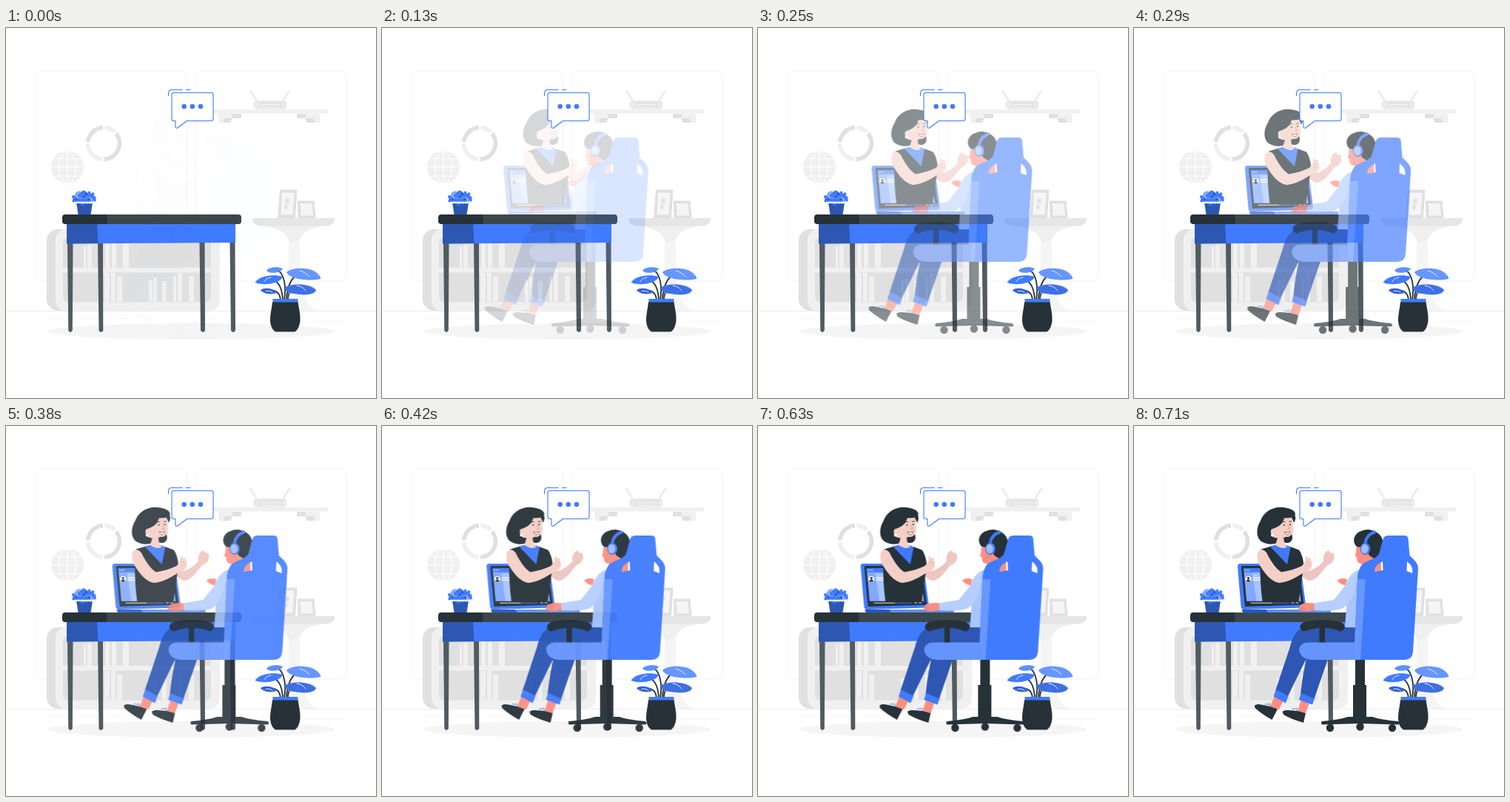
An HTML page that plays this animation: 500 px wide and 500 px high, repeating every 750 ms.

```html
<!DOCTYPE html>
<html lang="en">
<head>
<meta charset="utf-8">
<title>Online lesson</title>
<style>
  html, body { margin: 0; width: 100%; height: 100%; overflow: hidden; background: #fff; }
  svg { display: block; width: 100%; height: 100%; }
  .dark { fill: #263238; }
  .blue { fill: #407bff; }
  .navy { fill: #2d57b3; }
  .coral { fill: #ff8e80; }
  .skin { fill: #f4cfc7; }
  .g1 { fill: #f5f5f5; }
  .g2 { fill: #f0f0f0; }
  .g3 { fill: #e6e6e6; }
  .g4 { fill: #e0e0e0; }
  .white { fill: #fff; }
  .line { fill: none; stroke-linecap: round; stroke-linejoin: round; }
</style>
</head>
<body>
<svg viewBox="0 0 500 500">
  <!-- room -->
  <g class="line" stroke="#f5f5f5">
    <rect x="39.5" y="58" width="205" height="284" rx="8"/>
    <rect x="256.5" y="58" width="204" height="284" rx="8"/>
    <path stroke="#ebebeb" d="M0 382.5H500"/>
    <path d="M55 392.5H130M142 392.5H166M405 396.5H463"/>
  </g>

  <!-- globe and ring -->
  <circle class="g2" cx="83" cy="188" r="22"/>
  <g class="line" stroke="#fff" stroke-width="1.2">
    <path d="M83 166V210M61 188H105M65 176.500H101M65 200H101"/>
    <ellipse cx="83" cy="188" rx="11.500" ry="22"/>
  </g>
  <g class="line" stroke-width="5.500" style="stroke-linecap:butt">
    <path stroke="#e0e0e0" d="M110.700 154A21.400 21.400 0 0 1 131 134.600M148.700 142.500A21.400 21.400 0 0 1 133 177.300"/>
    <path stroke="#f0f0f0" d="M133.500 134.600A21.400 21.400 0 0 1 147 140.400M131 177.300A21.400 21.400 0 0 1 110.700 157"/>
  </g>

  <!-- wall shelf and router -->
  <path class="g2" d="M275 110H435V115.500H275ZM286 115H306V122L293 128H288ZM424 115H405V122L418 128H424Z"/>
  <path class="g4" d="M306 116H318V122H306ZM296 122H306L303 128H293ZM393 116H405V122H393ZM404 122H415L418 128H407Z"/>
  <path class="line" stroke="#e6e6e6" stroke-width="1.800" d="M339 99L330 84.500M374 99L383 84.500"/>
  <path class="g3" d="M337 99Q357 97 377 99Q381 101 379 107L376 109.500H338Q333 107 334 102Q335 99 337 99Z"/>
  <g class="line" stroke="#f5f5f5" stroke-width=".9">
    <circle cx="338" cy="104.500" r="2.600"/><circle cx="375.500" cy="104.500" r="2.200"/>
    <path d="M344 103.500H370M348 108H368"/>
  </g>

  <!-- bookcase -->
  <rect class="g4" x="55" y="272" width="60" height="110" rx="15"/>
  <rect class="g2" x="67" y="272" width="222" height="110" rx="14"/>
  <rect class="g4" x="77" y="283" width="200" height="87.500" rx="8"/>
  <g id="books"></g>
  <rect class="g2" x="77" y="324" width="200" height="6.500"/>

  <!-- side table and picture frames -->
  <path class="g1" d="M382 290H397C397 345 401 373 420 382H360C378 373 383 340 382 290Z"/>
  <path class="g2" d="M346 267H433C408 270 398 277 396 290H383C380 276 366 270 346 267Z"/>
  <path class="g3" d="M333 257H444Q444 267 432 267.500H346Q333 267 333 257Z"/>
  <path class="g4" d="M370 218.500H393.500L391 257H367ZM394 233.500H416.500L418.500 257H394.500Z"/>
  <path class="g1" d="M373 222.500H389.500L387.500 252.500H371.500ZM397.500 237H413.500L415 253.500H398.500Z"/>
  <ellipse class="g4" cx="380" cy="234" rx="2.500" ry="3.500"/>
  <ellipse class="g4" cx="378.500" cy="242" rx="2" ry="3.500"/>

  <ellipse class="g1" cx="250" cy="410" rx="194" ry="11"/>

  <!-- desk -->
  <g fill="#505b61">
    <path d="M83 290H90.500L89.800 409Q87 413 84.300 409ZM124 290H131L131.300 409Q128 413 125.500 409ZM261.500 290H268.500L269 409Q266 413 263 409ZM302.500 290H309.500L310 409Q307 413 304 409Z"/>
  </g>
  <path class="blue" d="M82 264H310V290L82 291.500Z"/>
  <path class="navy" d="M82 264H123L124.500 291L82 291.500Z"/>
  <rect x="76" y="252" width="242" height="13" rx="4" fill="#3c474d"/>
  <path class="dark" d="M80 252H135Q138 258 136 265H80Q76 265 76 258.500Q76 252 80 252Z"/>

  <!-- desk plant -->
  <path class="navy" d="M95 236H117L114.500 252H97.500Z"/>
  <g id="bush"></g>
  <rect class="white" x="93" y="234.700" width="24.500" height="2.400" rx="1"/>

  <!-- floor plant -->
  <g class="line" stroke="#263238" stroke-width="1.800">
    <path d="M376 367C379 350 376 333 368 328M379 367C380 350 385 340 391 335M374 367C373 352 369 345 364 342M371 367C370 359 367 356 362 355M381 367C381 358 384 354 389 352"/>
  </g>
  <path fill="#5d90ff" d="M352 328C355 323 367 322 374 325C372 331 357 333 352 328Z"/>
  <path fill="#6697ff" d="M379 330C387 323 411 323 420 331Q426 336 425 339C408 343 383 339 379 330Z"/>
  <path class="blue" d="M336.500 344C342 335 360 332 374 336C371 345 350 349 336.500 344Z"/>
  <path fill="#3f70e2" d="M376.500 351C383 345 410 344 419 354C418 360 405 362 389 359Q377 358 376.500 351Z"/>
  <path fill="#3364d0" d="M344 354C350 350 361 352 367 357C361 361 348 360 344 354Z"/>
  <g class="line" stroke="#fff" stroke-width="1">
    <path d="M397 328Q405 330 410 336M349 343Q351 338 358 337M393 348Q401 349 405 355M351 355.500Q356 354 360 357" opacity=".8"/>
  </g>
  <path class="dark" d="M360 370H394.500C396 381 398 386 397.500 396Q396 407 390.500 410.500H364Q358 407 357 396C357 386 359 380 360 370Z"/>
  <rect class="blue" x="360.500" y="366" width="34" height="4.500"/>

  <!-- teacher on the laptop -->
  <g id="teacher">
    <path class="blue" d="M143 186H221Q224.500 186 225 189L232 241Q232 245 229 245.500L149 248Q145 248 144.600 244L140 190Q140 186 143 186Z"/>
    <path class="dark" d="M146.500 189H220.500Q222.500 189 223 191L229.500 241.500L150 244L145 191Q145 189 146.500 189Z"/>
    <path fill="#82a9ff" d="M148 192H219.500L226 239L152.500 240.500Z"/>
    <path fill="#a8c4ff" d="M160 199H172L176 240H166Z"/>
    <path class="blue" d="M148 192H219.500L220.200 197.500H148.500Z"/>
    <g class="white">
      <circle cx="150.500" cy="194.800" r=".8"/><circle cx="153" cy="194.800" r=".8"/><circle cx="155.500" cy="194.800" r=".8"/>
      <rect x="160.500" y="204.500" width="12" height="1.300"/><rect x="160.500" y="207.500" width="12" height="1.300"/>
      <circle cx="154.500" cy="207" r="4"/>
    </g>
    <path class="dark" d="M151.500 209.500Q154.500 205 157.500 209.500Q154.500 212 151.500 209.500Z"/>
    <circle class="dark" cx="154.500" cy="205.500" r="1.600"/>
    <path class="dark" d="M152 236.800H225.500L226.200 241L152.500 242.500Z"/>
    <path class="line" stroke="#fff" stroke-width=".9" d="M158 239.200H186M213 239H216M219 239H222"/>
    <path class="line" stroke="#407bff" stroke-width=".9" d="M187 239.200H209"/>
    <path fill="#648fe8" d="M146 248H266V252H149Q146 252 146 248Z"/>
    <path class="navy" d="M146 248H178L182 252.500H149Q146 252 146 248Z"/>

    <path fill="#eec5c0" d="M226 190C231 196 234 196 238 195.500C247 192 251 188 256 183C255 177 258 169 262.500 168.500Q264 167 264 170L265 171C269 171 271 173 270.500 177C270 183 267 186 261 188.500C254 197 246 209 237 209Q228 207 223 197Z"/>
    <path class="dark" d="M172 166.500L187 162L205 182L211 163L223 167.500Q228 174 229.500 188L222.500 237H173.500Q170 210 170.500 186Z"/>
    <path class="blue" d="M184 163L191 160.500L208 161.500L211.500 164L207 187Z"/>
    <path class="dark" d="M213 123C221 122 220 113 205 110.500C189 107 175 116 171 128C164 139 165 153 174 157C182 161 190 160 196 157L204 157.500C211 160 216 154 213 147L203 150L198 136Z"/>
    <path class="skin" d="M187 139C194 137 201 133 203 124.500L213.500 124C215 129 214.500 133 215.500 138C216 146 212 150 207 150L204 149.500L204.500 162L207.500 162.500Q203 168 191 161L194 151.500Q186 151 185 145Q184 140 187 139Z"/>
    <path class="dark" d="M202 150C205 153 211 150 213 146C216 154 211 159 203 157Z"/>
    <path class="dark" d="M212.500 123.500C214.500 126 216 130 216 131Q220 125 217 120Z"/>
    <circle class="white" cx="187" cy="147.500" r="1.900"/>
    <circle class="dark" cx="202.800" cy="133.800" r="1"/><circle class="dark" cx="211" cy="133" r="1"/>
    <path class="line" stroke="#263238" stroke-width=".9" d="M199.500 131Q202 128 204 129.500M209.500 129.500Q211.500 127.500 213 129"/>
    <path class="line" stroke="#df8f87" stroke-width=".9" d="M208 134L210.500 139H207.500"/>
    <path class="white" stroke="#9d4c48" stroke-width=".8" d="M203 143Q207 145 211 142.500Q210 147.500 206 147Z"/>
    <path class="skin" d="M171.500 167C166 169 165.500 177 168 185C175 197 185 211 197 212C208 211 221 204 230 197.500C237 196 241 192 240.500 186L239 180Q239 177 236 179L233.500 176Q231 176 232 182L227 189C219 193 209 196 199 197.500C191 192 186 184 181 175Q178 167 171.500 167Z"/>
    <path class="line" stroke="#e2aaa2" stroke-width=".6" d="M233 184L238 184.500M233.500 188L238.500 188"/>
  </g>

  <!-- student on the chair -->
  <g id="student">
    <path class="dark" d="M299 315H312V350H314V395H296V350H299Z"/>
    <path class="dark" d="M254 399Q277 397 289 393H322Q334 397 357 399Q361 402 357 403.500L305.500 402L254 403.500Q252 401 254 399Z"/>
    <g class="dark">
      <circle cx="265" cy="408" r="5.200"/><circle cx="305.500" cy="406.500" r="5.200"/><circle cx="349" cy="408" r="5.200"/>
    </g>

    <path class="coral" d="M190 365L202 371L196 383L184 379ZM226 370L237 374L232 388L221 385Z"/>
    <path class="dark" d="M163 377.500Q166 375 172 376.500L184 379L194 382.500L186.500 397Q172 389 163.500 381ZM200.500 386Q203 383.500 208 384L221 385L232 388L229 401Q212 396 202 390Z"/>
    <path class="line" stroke="#407bff" stroke-width=".9" d="M177 377Q178 373 181 377Q183 372 184 379M214 384Q215 379 217 383Q221 378 220 385"/>
    <path class="navy" d="M306 270H238C222 272 216 280 211 298L191 358L207 367L231 318L248 300H306Z"/>
    <path class="navy" d="M235 306H265L261 318L243 370L225 363Q228 333 235 306Z"/>
    <path class="blue" d="M192 356L208.500 365L205 374.500L188.500 365.500ZM225.500 361L244 368.500L241 376.500L223 370Z"/>

    <path class="coral" d="M274.500 209Q279 204 288 207L286 216L279 213Z"/>
    <path class="coral" d="M318 172H334V204H312Z"/>
    <path fill="#a8c5ff" d="M302 195L335 197V273L285 272L287 245Q285 215 302 195Z"/>
    <path fill="#b7cfff" d="M302 195C294 198 289 206 285 216L270 235L242.500 239.500L243 249Q265 251 281 247C291 241 298 228 299 216Z"/>
    <path class="coral" d="M243.500 239.500Q234 238 226 241Q222 245 222.500 248.500Q232 252 244 248.500Z"/>
    <path class="line" stroke="#d86c61" stroke-width=".6" d="M223 246L230 244.500M224.500 249L231 247"/>

    <path class="coral" d="M301 160L300 171L298.500 176L301 177C301 184 304 187 310 186L323 183L325 160Z"/>
    <path class="dark" d="M301 163C294 157 297 145 307 142C314 138 325 140 331 146C338 152 338 164 334 172Q331 179 325 179.500L318 175L313 165Z"/>
    <path class="line" stroke="#407bff" stroke-width="4" d="M312.500 158Q314 147 325 143.500"/>
    <ellipse class="blue" cx="312.500" cy="166" rx="6.800" ry="8.200"/>
    <ellipse fill="#9fbfff" cx="311.800" cy="166" rx="4.800" ry="6.200"/>

    <rect class="dark" x="250.500" y="268" width="7.500" height="27"/>
    <path class="dark" d="M230 277.500C223 276 222 268 230 265C247 261 264 261 279 265C287 268 286 276 279 277.500C264 271 246 271 230 277.500Z"/>
    <path fill="#6494ff" d="M235 292.500H306V316H240Q225 315 223 302Q224 293 235 292.500Z"/>
    <path class="blue" fill-rule="evenodd" d="M344 148H365Q370 148 370.500 152L372.500 175C377 180 384 184 384 193L377 305Q376 316 366 316H297L302 207Q302 196 308 187C316 181 327 180 331 173L336.500 153Q338 148 344 148ZM336 183C328 187 324 192 325.500 197L336.500 195ZM369 183L368.500 196L376 199Q378 190 369 183Z"/>
    <path fill="#6797ff" d="M302 207H313L306 316H297Z"/>
  </g>

  <!-- speech bubble -->
  <g stroke="#407bff" stroke-width="1.100" stroke-linejoin="round">
    <path class="white" d="M226.500 87.500H277.500Q280 87.500 280 90V123Q280 125.500 277.500 125.500H244.500L232 135Q229 136 229 133V125.500H226.500Q224 125.500 224 123V90Q224 87.500 226.500 87.500Z"/>
    <path fill="none" d="M219.500 92V88Q219.500 83.500 224 83.500H238.500M243 83.500H249.500"/>
  </g>
  <g class="blue"><circle cx="240.700" cy="106" r="3.300"/><circle cx="251.800" cy="106" r="3.300"/><circle cx="263" cy="106" r="3.300"/></g>
</svg>

<script>
const $ = id => document.getElementById(id);

function add(parent, tag, attrs) {
  const el = document.createElementNS('http://www.w3.org/2000/svg', tag);
  for (const k in attrs) el.setAttribute(k, attrs[k]);
  parent.appendChild(el);
}

// Books as [x, width, height] standing on a shelf.
function stack(floor, books) {
  for (const [x, w, h] of books)
    add($('books'), 'rect', { x, y: floor - h, width: w, height: h, class: 'g2' });
}
stack(324, [[105, 3, 29], [110, 6, 31], [134, 6, 34], [143, 6, 34], [158, 8, 34]]);
stack(370, [[133, 7, 39], [142, 6, 39], [150, 7, 34], [193, 5, 29], [199, 5, 33], [211, 6, 28], [226, 4, 34], [232, 6, 39], [247, 7, 34]]);

// Leaves follow a spiral squeezed into a dome.
for (let i = 0; i < 44; i++) {
  const a = i * 2.4, r = Math.sqrt(i / 44), x = 105.500 + 15 * r * Math.cos(a);
  const y = 229.500 + 8.500 * r * Math.sin(a);
  add($('bush'), 'ellipse', {
    cx: x, cy: y, rx: 3, ry: 2, fill: i % 4 == 1 ? '#82a9ff' : i % 7 == 2 ? '#2d57b3' : '#407bff',
    transform: `rotate(${a * 40} ${x} ${y})`
  });
}

// Both groups slide apart with a small overshoot while fading in.
const LOOP = 750, STEP = 1000 / 24, SLIDE = 720;
const slides = [['teacher', 30], ['student', -30]].map(([id, dx]) => {
  const anim = $(id).animate(
    [{ opacity: 0, transform: `translateX(${dx}px)` }, { opacity: 1, transform: 'translateX(0px)' }],
    { duration: SLIDE, easing: 'cubic-bezier(.36,-.01,.5,1.38)', fill: 'both' });
  anim.pause();
  return anim;
});

const start = performance.now();
function draw(now) {
  const t = Math.max(0, now - start) % LOOP;
  const step = Math.floor(t / STEP + .1) % 18;
  for (const s of slides) s.currentTime = Math.min((step + 1) * STEP, SLIDE);
  requestAnimationFrame(draw);
}
draw(start);
</script>
</body>
</html>
```
